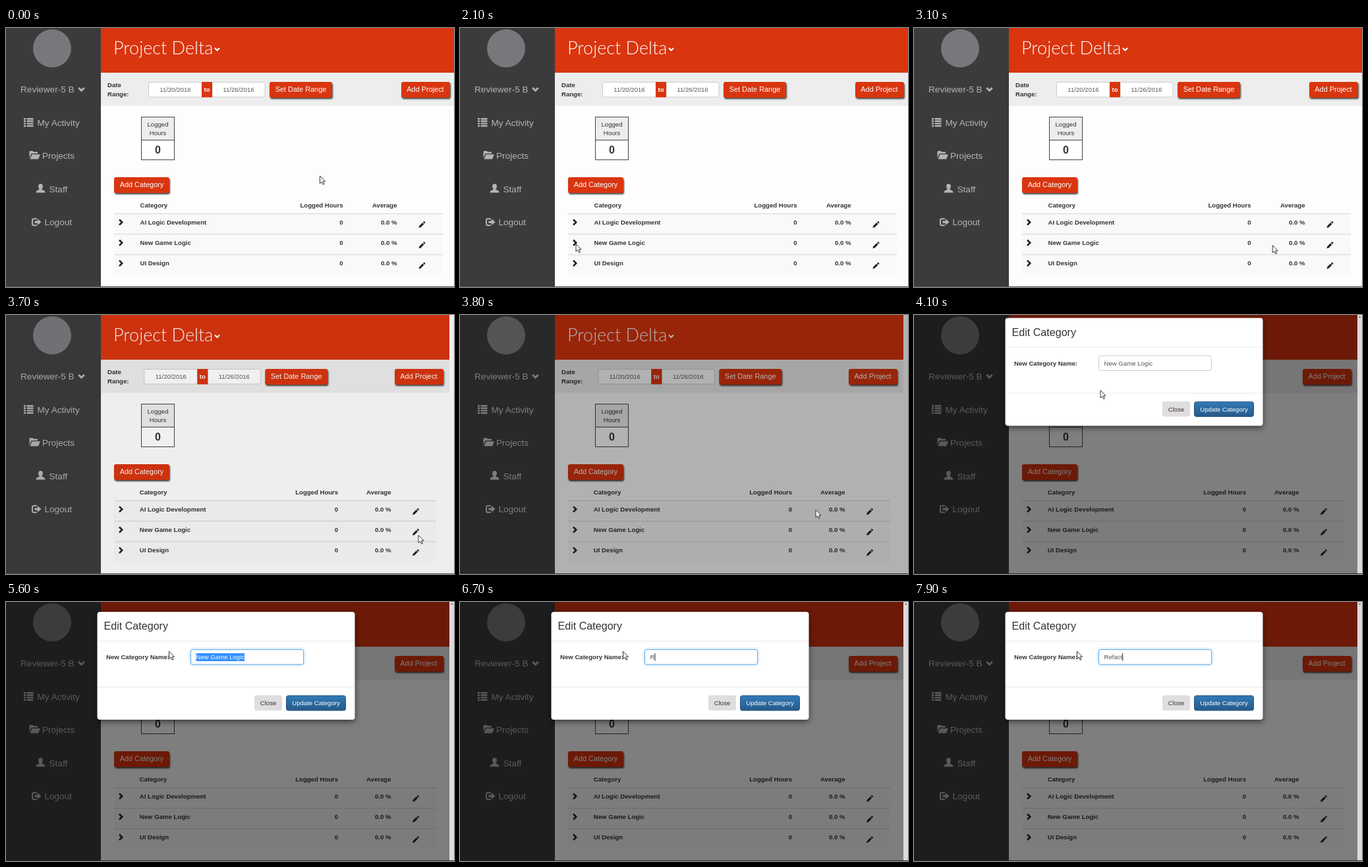
Write an HTML page that moves like this. It is 680x394 px and loops after 8 s.

```html
<!DOCTYPE html>
<html lang="en">
<head>
<meta charset="utf-8">
<title>Edit category</title>
<style>
html, body { margin: 0; width: 100%; height: 100%; overflow: hidden; }
svg { display: block; width: 680px; height: 394px; }
text { font: 9.6px "Liberation Sans", Arial, sans-serif; fill: #333; white-space: pre; }
.b { font-weight: bold; }
.r { text-anchor: end; }
.c { text-anchor: middle; }
.title { font: 300 27px Lato, sans-serif; fill: #fff; }
.side text { font-size: 13.6px; fill: #b4b4b4; }
.btn rect { fill: #d9350f; filter: drop-shadow(1px 2px 1px #444); }
.btn text { font-size: 10.9px; fill: #fff; text-anchor: middle; }
.field { fill: #fff; stroke: #ccc; }
.line { stroke: #d4d4d4; fill: none; }
.stroke { fill: none; stroke: #222; stroke-width: 2.6; }
#modal > .panel { fill: #fff; filter: drop-shadow(0 3px 5px rgba(0,0,0,.55)); }
</style>
</head>
<body>
<svg viewBox="0 0 680 394">
  <defs>
    <linearGradient id="blue" x2="0" y2="1">
      <stop stop-color="#337ab7"/><stop offset="1" stop-color="#265a88"/>
    </linearGradient>
  </defs>
  <rect width="680" height="394" fill="#fdfdfd"/>
  <rect id="head" x="144" width="536" height="68" fill="#d9350f"/>
  <rect id="band" x="144" y="68" width="536" height="50.5" fill="#ededed"/>
  <text class="title" x="163" y="40">Project Delta</text>
  <path class="stroke" d="M317 30.5l3.5 3.5l3.5-3.5" style="stroke:#fff;stroke-width:2.2"/>

  <text class="b" x="154" y="90">Date</text>
  <text class="b" x="154" y="104">Range:</text>
  <g data-dx="-6.7">
    <rect class="field" x="216.5" y="82.5" width="81" height="22.5" rx="2"/>
    <rect class="field" x="313" y="82.5" width="80" height="22.5" rx="2"/>
    <rect x="297" y="82" width="16" height="23.5" fill="#d9350f"/>
    <text class="c" x="257" y="97" style="fill:#555">11/20/2016</text>
    <text class="c" x="353" y="97" style="fill:#555">11/26/2016</text>
    <text class="b c" x="305" y="97" style="fill:#fff">to</text>
    <g class="btn"><rect x="400" y="82" width="95" height="24" rx="3"/><text x="447.5" y="97">Set Date Range</text></g>
  </g>
  <g class="btn" data-dx="-10"><rect x="600" y="82" width="74" height="24" rx="3"/><text x="636.5" y="97">Add Project</text></g>

  <g stroke="#444"><rect x="205.5" y="135.5" width="50" height="65" fill="#fff"/><rect x="205.5" y="135.5" width="50" height="35" fill="#ededed"/></g>
  <text class="c" x="230.5" y="150">Logged</text>
  <text class="c" x="230.5" y="163">Hours</text>
  <text class="b c" x="230.5" y="191" style="font-size:16px">0</text>
  <g class="btn"><rect x="164" y="227" width="84" height="24" rx="3"/><text x="206" y="242">Add Category</text></g>

  <text class="b" data-dx="-.7" x="203.5" y="273">Category</text>
  <text class="b r" data-dx="-7.3" x="511.5" y="273">Logged Hours</text>
  <text class="b r" data-dx="-9" x="593.5" y="273">Average</text>
  <g id="rows"></g>

  <rect width="144" height="394" fill="#3b3b3b"/>
  <circle cx="70" cy="31" r="29" fill="#77787b"/>
  <g class="side">
    <text x="22" y="98">Reviewer-5 B</text>
    <text x="47.5" y="148.5">My Activity</text>
    <text x="55" y="199">Projects</text>
    <text x="65.5" y="249.5">Staff</text>
    <text x="58.5" y="300">Logout</text>
    <g fill="#b4b4b4">
      <path d="M27 137h3v2.4h-3zm4.5 0h10v2.4h-10zM27 140.6h3v2.4h-3zm4.5 0h10v2.4h-10zM27 144.2h3v2.4h-3zm4.5 0h10v2.4h-10zM27 147.8h3v2.4h-3zm4.5 0h10v2.4h-10z"/>
      <path d="M35.5 198v-10l1-1h4l1.500 1.500h6v2.500h-9.500zM39.500 192.200h12.500l-3 7.300h-12.500z"/>
      <path d="M52.500 237c4.500 0 4 6 1.700 8.300c1 1.500 5.300 1.400 5.300 5.200h-14c0-3.800 4.300-3.700 5.300-5.200c-2.300-2.300-2.800-8.300 1.700-8.300z"/>
      <path d="M43.500 293.500h4.500v-3.200l5.500 4.900l-5.500 4.900v-3.200h-4.500z"/>
    </g>
    <g class="stroke" style="stroke:#b4b4b4">
      <path d="M110.300 91l4.200 4.200l4.200-4.200" stroke-width="3"/>
      <path d="M47 290.300h-5q-2 0-2 2v6q0 2 2 2h5" stroke-width="2"/>
    </g>
  </g>
  <rect y="393" width="680" height="1" fill="#555"/>

  <rect id="dim" width="680" height="394"/>
  <g id="bar">
    <rect x="673" width="7" height="393" fill="#dcdadc"/>
    <path d="M675 4l1.700-2.200l1.700 2.200z" fill="#555"/>
  </g>
  <g id="modal">
    <rect class="panel" x="138.500" y="15" width="391" height="164" rx="4"/>
    <path class="line" d="M139 59.500h390M139 129.500h390" style="stroke:#e8e8e8"/>
    <text x="148.500" y="42" style="font-size:16.100px">Edit Category</text>
    <text class="b" x="152" y="87">New Category Name:</text>
    <rect id="input" class="field" x="280.500" y="72.500" width="171" height="22.500" rx="3"/>
    <rect id="sel" y="78" height="12" fill="#3390ff"/>
    <text id="value" x="288.500" y="87" style="fill:#555"><tspan id="plain"></tspan><tspan id="picked" fill="#fff"></tspan></text>
    <rect id="caret" y="78" width="1" height="11.500" fill="#222"/>
    <rect x="377" y="142" width="42" height="23" rx="3" fill="#e0dde0"/>
    <text class="c" x="398" y="157">Close</text>
    <rect x="425.500" y="142.500" width="90" height="22.500" rx="3" fill="url(#blue)" stroke="#245580"/>
    <text class="c" x="470.500" y="157" style="fill:#fff">Update Category</text>
  </g>
  <g id="cursor">
    <path id="arrow" d="M0 0v11.500l2.700-2.500l1.900 4.200l1.900-.8l-1.900-4.100h3.500z" fill="#fff" stroke="#333"/>
    <path id="beam" d="M-2 0h4M0 0v11M-2 11h4" stroke="#333" fill="none"/>
  </g>
</svg>
<script>
const $ = id => document.getElementById(id);
const set = (id, attrs) => { for (const k in attrs) $(id).setAttribute(k, attrs[k]); };
const show = (id, on) => { $(id).style.display = on ? '' : 'none'; };

$('rows').innerHTML = ['AI Logic Development', 'New Game Logic', 'UI Design'].map((name, i) => `
  <g transform="translate(0 ${i * 31.2})">
    <rect class="rowBox" x="164" y="283" width="499" height="30.500" fill="#f9f9f9"/>
    <path class="line rule" d="M164 282.500h499"/>
    <path class="stroke" d="M172 291.300l4.200 4.200l-4.200 4.200"/>
    <text class="b" data-dx="-.7" x="203.500" y="299">${name}</text>
    <text class="b r" data-dx="-7.300" x="511.500" y="299">0</text>
    <text class="b r" data-dx="-9" x="593.500" y="299">0.0 %</text>
    <path data-dx="-9.500" d="M626.500 304l.8-3l5-5l2.200 2.200l-5 5zM633 295.300l1-1q.6-.5 1.200 0l1 1q.5.600 0 1.200l-1 1z" fill="#222"/>
  </g>`).join('');

// Linear interpolation through [time, ...values] keys
function at(keys, t) {
  if (t <= keys[0][0]) return keys[0].slice(1);
  const i = keys.findIndex(k => k[0] > t);
  if (i < 0) return keys[keys.length - 1].slice(1);
  const a = keys[i - 1], b = keys[i], f = (t - a[0]) / (b[0] - a[0]);
  return a.slice(1).map((v, j) => v + (b[j + 1] - v) * f);
}

const pointer = [[300, 476.5, 225], [1200, 318, 324], [1600, 176, 332], [1800, 176, 332],
  [2100, 176, 328.5], [2200, 176, 328.5], [3300, 626, 331], [3700, 626, 335], [3900, 454, 258],
  [4100, 283, 114.5], [4500, 364, 78], [4900, 364, 78], [5500, 247.5, 75]];
const dimming = [[3600, 0], [3700, .06], [3800, .3], [3900, .5]];
const slide = [[3900, -40, 0], [4000, -25, .6], [4100, -10.5, 1], [4200, -3, 1], [4300, 0, 1]];
const keyTimes = [6500, 6800, 7000, 7300, 7600, 7900];
const oldName = 'New Game Logic', newName = 'Refact';

function layout(open) {
  document.querySelectorAll('[data-dx]').forEach(el =>
    el.setAttribute('transform', `translate(${open ? el.dataset.dx : 0} 0)`));
  const width = open ? 529 : 536, table = open ? 489 : 499;
  set('head', { width });
  set('band', { width });
  document.querySelectorAll('.rowBox').forEach(el => el.setAttribute('width', table));
  document.querySelectorAll('.rule').forEach(el => el.setAttribute('d', `M164 282.5h${table}`));
}

function drawField(t, x) {
  const typed = keyTimes.filter(k => t >= k).length;
  const text = typed ? newName.slice(0, typed) : oldName;
  const focused = t >= 4900;
  $('plain').textContent = text;
  $('picked').textContent = '';
  const value = $('value');
  const edges = [...text].map((_, i) => value.getStartPositionOfChar(i).x);
  const end = value.getEndPositionOfChar(text.length - 1).x;
  let from = text.length;
  if (focused && !typed) while (from > 0 && edges[from - 1] > x - 2) from--;
  const left = from < text.length ? edges[from] : end;
  $('plain').textContent = text.slice(0, from);
  $('picked').textContent = text.slice(from);
  set('sel', { x: left, width: end - left });
  set('caret', { x: end });
  show('caret', focused && from === text.length);
  $('input').style.cssText = focused
    ? 'stroke:#66afe9;filter:drop-shadow(0 0 2px rgba(102,175,233,.7))' : '';
}

let last = -1;
function frame(now) {
  const t = Math.floor(now % 8000 / 100) * 100;
  if (t !== last) {
    last = t;
    const [x, y] = at(pointer, t), [dy, alpha] = at(slide, t);
    layout(t >= 3700);
    set('dim', { opacity: at(dimming, t)[0] });
    show('modal', alpha > 0);
    show('bar', alpha > 0);
    set('modal', { transform: `translate(0 ${dy})`, opacity: alpha });
    if (alpha > 0) drawField(t, x);
    const overText = alpha > 0 && x > 284 && x < 451 && y > 70 && y < 92;
    set('cursor', { transform: `translate(${x} ${y})` });
    show('arrow', !overText);
    show('beam', overText);
  }
  requestAnimationFrame(frame);
}
requestAnimationFrame(frame);
</script>
</body>
</html>
```
